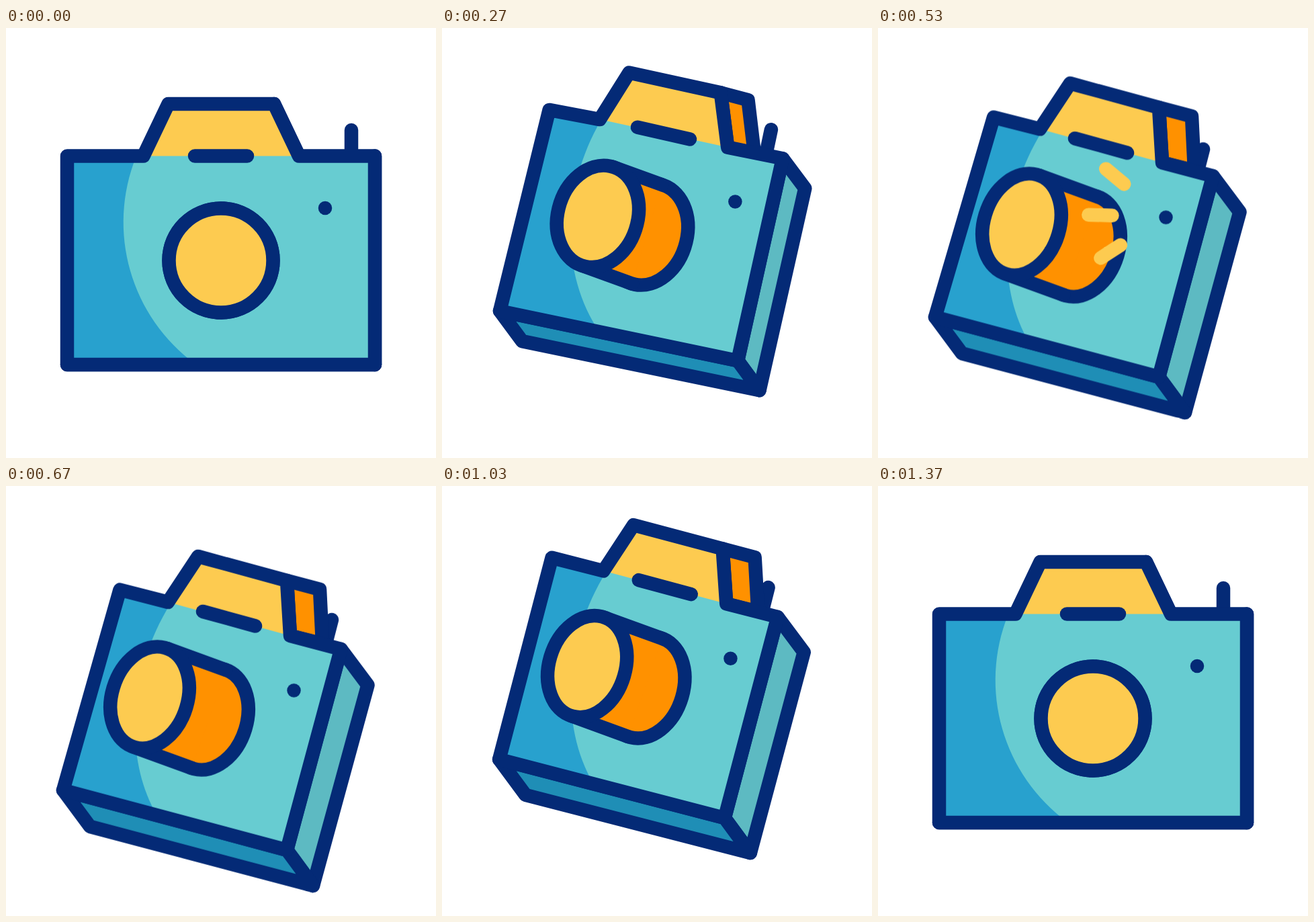
An HTML page without scripts for the animation above (2000 ms loop, 640 by 640 pixels).

```html
<!DOCTYPE html>
<html lang="en">
<head>
<meta charset="utf-8">
<title>Camera</title>
<style>
  @property --head { syntax: "<length>"; inherits: true; initial-value: 0px; }
  @property --tail { syntax: "<length>"; inherits: true; initial-value: 0px; }

  html, body { margin: 0; width: 100%; height: 100%; overflow: hidden; background: #fff; }
  svg { display: block; width: 100%; height: 100%; }

  svg * {
    animation-duration: 2s;
    animation-iteration-count: infinite;
    animation-timing-function: cubic-bezier(.333, 0, .667, 1);
  }
  path {
    fill: none; stroke: #042a76; stroke-width: 20.5;
    stroke-linecap: round; stroke-linejoin: round;
  }

  /* Each part turns from its front view (--a) to its tilted view (--b, drifting to --c) and back. */
  .turn { d: var(--a); animation-name: turn; }
  @keyframes turn {
    0%, 68.333%, 100% { d: var(--a); }
    18.333% { d: var(--b); }
    50% { d: var(--c, var(--b)); }
  }

  .camera { animation-name: bob; }
  @keyframes bob {
    0%, 18.333%, 50%, 100% { transform: translateY(0); }
    34.167% { transform: translateY(48px); }
  }

  .press { animation-name: press; }
  @keyframes press {
    0%, 18.333%, 35%, 100% { transform: translate(0, 0); }
    26.667% { transform: translate(-1px, 4px); }
  }

  .flash { animation-name: head, tail, show; }
  .flash path {
    stroke: #fdcb50;
    stroke-dasharray: calc(var(--head) - var(--tail)) 999px;
    stroke-dashoffset: calc(-1 * var(--tail));
  }
  @keyframes head { 0%, 16.667% { --head: 0px; } 30%, 100% { --head: 134px; } }
  @keyframes tail { 0%, 18.333% { --tail: 0px; } 33.333%, 100% { --tail: 134px; } }
  @keyframes show {
    0%, 16.8%, 33.1%, 100% { visibility: hidden; }
    16.81%, 33.09% { visibility: visible; }
  }

  .fill { stroke: none; }
  .teal { fill: #67ccd1; }
  .yellow { fill: #fdcb50; }
  .orange { fill: #ff9100; }

  .button {
    --a: path("M514 152L514 190");
    --b: path("M485 151L476 186");
  }
  .side {
    fill: #5dbac2;
    --a: path("M549 190.5L549 190.5 549 501 549 501Z");
    --b: path("M498.5 195L538.5 248.5 457 547 418 494Z");
  }
  .base {
    fill: #1f8eb6;
    --a: path("M91 501L91 501 549 501 549 501Z");
    --b: path("M85 405L125 459 457 547 418 494Z");
  }
  .prism-side {
    --a: path("M399 113L399 113 436 190.5 436 190.5Z");
    --b: path("M418 93L467 106 471 187 423 175Z");
  }
  .shell {
    --a: path("M91 190.5L204.5 190.5 241.5 113 399 113 436 190.5 549 190.5 549 501 91 501Z");
    --b: path("M173.5 108L241 125 286 57 418 93 423 175 498.5 195 418 494 85 405Z");
    --c: path("M165 105L241 125 286 57 418 93 423 175 498.5 195 418 494 85 405Z");
  }
  .shade {
    fill: #28a1ce;
    --a: path("M91 190.5L194 190.5C148.7 302.3 185.5 430 283 501L91 501Z");
    --b: path("M173.5 108L245 127C183 226 174 355 224.5 442L85 405Z");
    --c: path("M165 105L245 127C183 226 174 355 224.5 442L85 405Z");
  }
  .prism {
    --a: path("M204.5 190.5L241.5 113 399 113 436 190.5Z");
    --b: path("M241 125L286 57 418 93 423 175Z");
  }
  .slot {
    --a: path("M281 190.5L359 190.5");
    --b: path("M293 139L371 160.5");
  }
  .dot {
    --a: path("M475 268L475 268");
    --b: path("M428.5 256.5L428.5 256.5");
  }
  .lens {
    --a: path("M320 268.5c42.8 0 77.5 34.7 77.5 77.5s-34.7 77.5 -77.5 77.5 -77.5 -34.7 -77.5 -77.5 34.7 -77.5 77.5 -77.5z");
    --b: path("M236.2 192.9c30 8.1 44.4 47.9 32.1 88.8s-46.5 67.5 -76.5 59.4 -44.4 -47.9 -32.1 -88.8 46.5 -67.5 76.5 -59.4z");
  }
  .lens.rear {
    --b: path("M324.2 224.9c30 8.1 44.4 47.9 32.1 88.8s-46.5 67.5 -76.5 59.4 -44.4 -47.9 -32.1 -88.8 46.5 -67.5 76.5 -59.4z");
  }
  .barrel {
    --a: path("M324.7 268.7L324.7 268.7 315.3 423.3 315.3 423.3");
    --b: path("M327.5 226L239.5 194 188.5 340 276.5 372");
  }
</style>
</head>
<body>
<svg viewBox="0 0 640 640">
  <g class="camera">
    <g class="press"><path class="turn button"/></g>
    <path class="turn side"/>
    <path class="turn base"/>
    <path class="turn prism-side orange"/>

    <path class="turn shell fill teal"/>
    <path class="turn shade fill"/>
    <path class="turn prism fill yellow"/>
    <path class="turn shell"/>
    <path class="turn slot"/>
    <path class="turn dot"/>

    <path class="turn lens rear orange"/>
    <path class="turn barrel orange"/>
    <path class="turn lens yellow"/>

    <g class="flash">
      <path d="M425 256l-103-86"/>
      <path d="M425 256l-134-4"/>
      <path d="M425 256l-112 73"/>
    </g>
  </g>
</svg>
</body>
</html>
```
